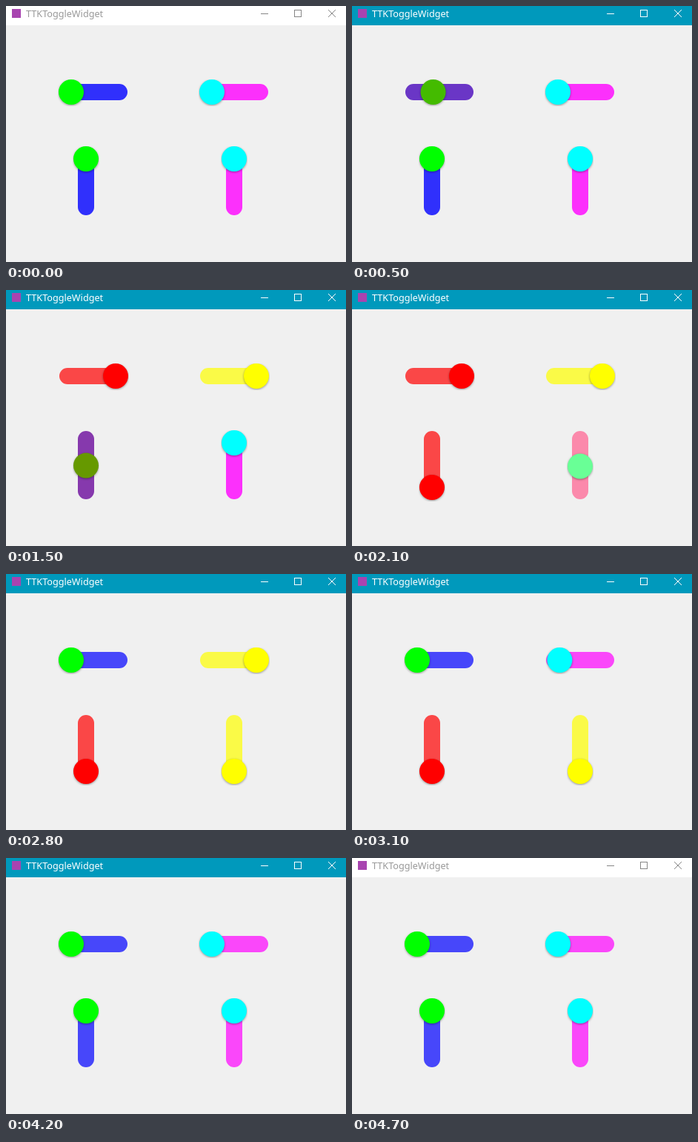
Write an HTML page that moves like this. It is 459 by 345 pixels and loops after 4800 ms.

```html
<!DOCTYPE html>
<html lang="en">
<head>
<meta charset="utf-8">
<title>TTKToggleWidget</title>
<style>
  html, body { margin: 0; width: 100%; height: 100%; overflow: hidden; background: #f0f0f0; }
  #stage { position: relative; width: 459px; height: 345px; overflow: hidden; background: #f0f0f0; }
  #bar { position: absolute; inset: 0 0 auto; height: 26px; background: #fff; color: #999; }
  #bar.active { background: #0099bc; color: #fff; }
  #bar span {
    position: absolute; left: 27px; top: 1px; line-height: 19px; white-space: nowrap;
    font-family: "Noto Sans", "Open Sans", sans-serif; font-size: 12.65px;
  }
  #bar i { position: absolute; left: 8px; top: 4px; width: 12px; height: 12px; background: #a844b0; }
  #bar svg { position: absolute; left: 0; top: 0; fill: none; stroke: #858585; }
  #bar.active svg { stroke: #fff; }
  .toggle { position: absolute; overflow: hidden; }
  .track, .thumb { position: absolute; }
  .track { border-radius: 11px; }
  .thumb { width: 34px; height: 34px; border-radius: 50%; box-shadow: 0 1px 3px rgba(0, 0, 0, .38); }
</style>
</head>
<body>
<div id="stage">
  <div id="bar">
    <i></i>
    <span>TTKToggleWidget</span>
    <svg width="459" height="26">
      <path d="M344 10.5h10M389.5 5.5h9v9h-9z" shape-rendering="crispEdges"/>
      <path d="M435 5l10 10M445 5l-10 10"/>
    </svg>
  </div>
</div>
<script>
const LOOP = 4800, TICK = 100, SLIDE = 200, FADE = 150, LAG = 20, TRAVEL = 60;
const RED = [255, 0, 0], GREEN = [0, 255, 0], BLUE = [0, 0, 255];
const YELLOW = [255, 255, 0], CYAN = [0, 255, 255], MAGENTA = [255, 0, 255];

const stage = document.getElementById('stage');
const bar = document.getElementById('bar');

// on / off: when each press starts to move the thumb
const toggles = [
  { x: 70, y: 99, on: 460, off: 2540, thumb: [GREEN, RED], track: [BLUE, RED] },
  { x: 260, y: 99, on: 904, off: 2940, thumb: [CYAN, YELLOW], track: [MAGENTA, YELLOW] },
  { x: 90, y: 189, tall: true, on: 1440, off: 3485, thumb: [GREEN, RED], track: [BLUE, RED] },
  { x: 290, y: 189, tall: true, on: 2038, off: 3940, thumb: [CYAN, YELLOW], track: [MAGENTA, YELLOW] }
];

const clamp = v => Math.min(1, Math.max(0, v));
const outQuad = u => u * (2 - u);
const mix = (a, b, k) => a + (b - a) * k;
const blend = ([a, b], k, alpha = 1) =>
  `rgba(${a.map((v, i) => Math.round(mix(v, b[i], k))).join()},${alpha})`;

function box(parent, name, left, top, width, height) {
  const el = parent.appendChild(document.createElement('div'));
  el.className = name;
  el.style.left = left + 'px';
  el.style.top = top + 'px';
  if (width) {
    el.style.width = width + 'px';
    el.style.height = height + 'px';
  }
  return el;
}

for (const g of toggles) {
  const body = g.tall ? box(stage, 'toggle', g.x, g.y, 36, 96)
                      : box(stage, 'toggle', g.x, g.y, 96, 36);
  g.trackEl = g.tall ? box(body, 'track', 7, 1, 22, 92) : box(body, 'track', 2, 6, 92, 22);
  g.thumbEl = g.tall ? box(body, 'thumb', 1, 0) : box(body, 'thumb', 1, 0);
}

// linear progress since a press
function progress(t, start, length) {
  const dt = t - start;
  return dt < LAG ? 0 : clamp(dt / length);
}

function draw(time) {
  const t = Math.floor(time % LOOP / TICK) * TICK;
  bar.className = t >= 500 && t < 4700 ? 'active' : '';
  for (const g of toggles) {
    const shift = outQuad(progress(t, g.on, SLIDE)) - outQuad(progress(t, g.off, SLIDE));
    const first = progress(t, g.on, FADE);
    const tint = first - progress(t, g.off, FADE);
    const px = shift * TRAVEL + 'px';
    g.thumbEl.style.transform = g.tall ? `translateY(${px})` : `translateX(${px})`;
    g.thumbEl.style.backgroundColor = blend(g.thumb, tint);
    g.trackEl.style.backgroundColor = blend(g.track, tint, mix(.8, .7, first));
  }
}

const begin = performance.now();
function loop() {
  draw(performance.now() - begin);
  requestAnimationFrame(loop);
}
loop();
</script>
</body>
</html>
```
